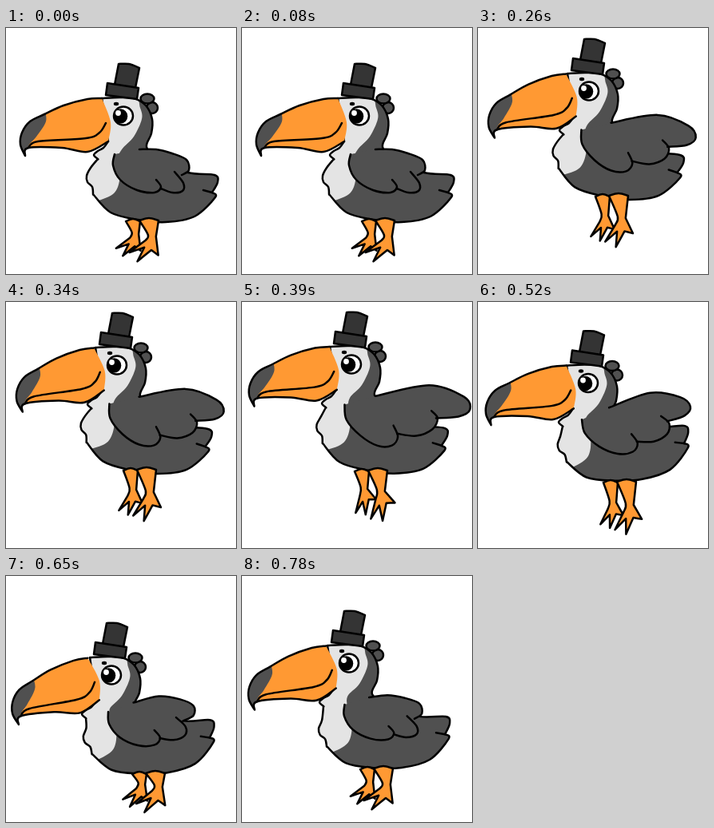
These frames come from a looping animation (288 by 308 pixels, 0.91 s). An HTML page with a canvas:

```html
<!DOCTYPE html>
<html lang="en">
<head>
<meta charset="utf-8">
<title>Flapping toucan</title>
<style>
html, body { margin: 0; width: 100%; height: 100%; overflow: hidden; background: #fff; }
canvas { display: block; }
</style>
</head>
<body>
<canvas id="stage" width="288" height="308"></canvas>
<script>
const ctx = document.getElementById('stage').getContext('2d');
const STEP = 130;
const GREY = '#505050', DARK = '#343434', ORANGE = '#ff9933', PALE = '#e4e4e4';

// A shape is smooth runs of points; "/" starts a new run, leaving a corner.
const parse = s => s.split('/').map(run => run.trim().split(/\s+/).map(p => p.split(',').map(Number)));

const nape = parse('120,88 142,87 160,88 175,97 183,114 182,132 176,149');
const throat = parse('115,164 110,159 115,154 122,150 128,142');
const face = parse('118,80 160,85 168,100 170,114 160,136 145,152');
const beak = parse('120,88 102,89 72,97 48,108 30,117 20,131 18,146 24,160 / 28,150 70,150 102,155 128,142');
const cheek = parse('128,142 131,118 120,88');
const tip = parse('48,100 50,117 38,136 28,148 24,168 / 5,168 / 5,100');
const smile = parse('28,150 40,142 100,138 117,131 125,119');
const crown = parse('141,45 / 154,45 167,50 / 162,75 / 136,71');
const brim = parse('127,69 / 166,75 / 164,89 / 125,84');
const tail = parse('190,165 228,181 261,184 265,193 258,206');
const under = parse('258,206 262,212 236,236 200,243 165,240 131,231 109,208');
const chest = parse('109,208 108,199 102,193 101,185 106,175');
const notch = parse('258,206 247,203');
const bib = parse('140,165 143,184 136,206 113,217 90,222 90,160');

// Three feather lobes each; every wing pose blends these two.
const folded = parse('136,158 134,172 143,190 164,203 186,206 194,199 188,190 / ' +
  '194,201 208,206 221,204 222,194 211,180 / 220,184 229,178 226,165 208,157 188,152 167,152');
const raised = parse('135,159 138,178 156,197 178,209 196,208 203,197 197,183 / ' +
  '202,193 226,195 246,186 252,172 244,163 / 250,172 278,169 292,160 284,144 240,131 173,147');

const BELLY = [180, 200], JAW = [124, 110];

// head: x, y, beak turn; body: x, y, turn; legs: hip x, y, drop, toe angle
const pose = (head, body, lift, legs) => ({ head, body, lift, legs });
const poses = [
  pose([0, 0, 0], [0, 0, 0], 0, [167, 240, 26, 152]),
  pose([-8, 6, -5.5], [-6, 8, 2], 0.42, [167, 239, 20, 140]),
  pose([-8, -31, -5], [-8, -29, 3], 0.8, [164, 209, 34, 130]),
  pose([-10, -32, -1.5], [-8, -29, 2], 1, [158, 210, 32, 113]),
  pose([-9, -8.5, -1.5], [0, -18, -8], 0.7, [174, 224, 35, 125]),
  pose([-15, 14, -7], [-3, 6, -7], 0.25, [175, 246, 23, 150]),
  pose([-13, -1, -5], [-4, -1, -5], 0.05, [165, 240, 26, 152])
];

const mix = (a, b, t) => a.map((run, i) => run.map(([x, y], j) =>
  [x + (b[i][j][0] - x) * t, y + (b[i][j][1] - y) * t]));

// Returns a function that shifts and turns runs around a pivot.
function placer([dx, dy, deg], [px, py]) {
  const a = deg * Math.PI / 180, c = Math.cos(a), s = Math.sin(a);
  return runs => runs.map(run => run.map(([x, y]) => {
    const u = x - px, v = y - py;
    return [px + dx + u * c - v * s, py + dy + u * s + v * c];
  }));
}

// Catmull-Rom curve through each run, runs joined end to end.
function trace(runs, closed) {
  const path = new Path2D();
  let last = null;
  for (const run of runs) {
    const pts = last ? [last, ...run] : run;
    if (!last) path.moveTo(...pts[0]);
    for (let i = 0; i < pts.length - 1; i++) {
      const p = pts[i], q = pts[i + 1], a = pts[i - 1] || p, b = pts[i + 2] || q;
      path.bezierCurveTo(p[0] + (q[0] - a[0]) / 6, p[1] + (q[1] - a[1]) / 6,
        q[0] - (b[0] - p[0]) / 6, q[1] - (b[1] - p[1]) / 6, q[0], q[1]);
    }
    last = pts[pts.length - 1];
  }
  if (closed) path.closePath();
  return path;
}

function paint(path, fill, line = true) {
  if (fill) {
    ctx.fillStyle = fill;
    ctx.fill(path);
  }
  if (line) ctx.stroke(path);
}

function paintInside(outline, path, fill) {
  ctx.save();
  ctx.clip(outline);
  paint(path, fill, false);
  ctx.restore();
}

function oval(x, y, rx, ry, fill, line = false) {
  const path = new Path2D();
  path.ellipse(x, y, rx, ry, 0, 0, Math.PI * 2);
  paint(path, fill, line);
}

// Tapered thigh, then a heel and two long toes fanned around the ankle.
function leg(x, y, width, drop, angle, size) {
  const ax = x + width * 0.66, ay = y + drop;
  const ray = (length, turn) => {
    const a = (angle + turn) * Math.PI / 180;
    return [[ax + Math.cos(a) * length * size, ay + Math.sin(a) * length * size]];
  };
  paint(trace([
    [[x, y + 1], [x + width / 2, y - 2], [x + width, y + 1]],
    [[ax + 5 * size, ay - 5]],
    ray(20, -85), ray(12, -58), ray(32, -27), ray(13, -14), ray(32, 0), ray(8, 30),
    [[ax - 5 * size, ay - 7], [x, y + 1]]
  ], true), ORANGE);
}

function draw({ head, body, lift, legs }) {
  const [hx, hy] = head;
  const onHead = placer([hx, hy, 0], JAW), onBeak = placer(head, JAW), onBody = placer(body, BELLY);
  const H = s => onHead(s)[0], B = s => onBody(s)[0];

  ctx.fillStyle = '#fff';
  ctx.fillRect(0, 0, 288, 308);
  ctx.strokeStyle = '#000';
  ctx.lineWidth = 2.5;
  ctx.lineJoin = ctx.lineCap = 'round';

  oval(hx + 183, hy + 100, 7, 7, GREY, true);
  oval(hx + 177, hy + 88.5, 8.5, 6, GREY, true);

  const neck = H(throat);
  const torso = trace([[...H(nape), ...B(tail)], B(under), [...B(chest), neck[0]], neck], true);
  paint(torso, GREY, false);
  paintInside(torso, trace([[...H(face), ...B(bib)]], true), PALE);
  paint(torso);
  paint(trace(onBody(notch)));

  const [x, y, drop, angle] = legs;
  leg(x - 17, y + 1, 18, drop - 4, angle, 0.85);
  leg(x, y, 24, drop, angle, 1);

  const wing = onBody(mix(folded, raised, lift));
  paint(trace(wing), GREY, false);
  for (const lobe of wing) paint(trace([lobe]));

  const bill = trace([...onBeak(beak), ...onBeak(cheek)], true);
  paint(bill, ORANGE, false);
  paintInside(bill, trace(onBeak(tip), true), GREY);
  paint(trace(onBeak(beak)));
  paint(trace(onBeak(smile)));

  oval(hx + 147, hy + 110, 12, 11.5, '#fff', true);
  oval(hx + 143.5, hy + 110.5, 8.8, 9.2, '#000');
  oval(hx + 140.5, hy + 106.5, 3.4, 3.4, '#fff');
  oval(hx + 138, hy + 95, 3.2, 2.2, '#000');

  paint(trace(onHead(crown), true), DARK);
  paint(trace(onHead(brim), true), DARK);
}

const start = performance.now();
let shown = -1;
function tick() {
  const i = Math.floor((performance.now() - start) / STEP) % poses.length;
  if (i !== shown) draw(poses[shown = i]);
  requestAnimationFrame(tick);
}
tick();
</script>
</body>
</html>
```
